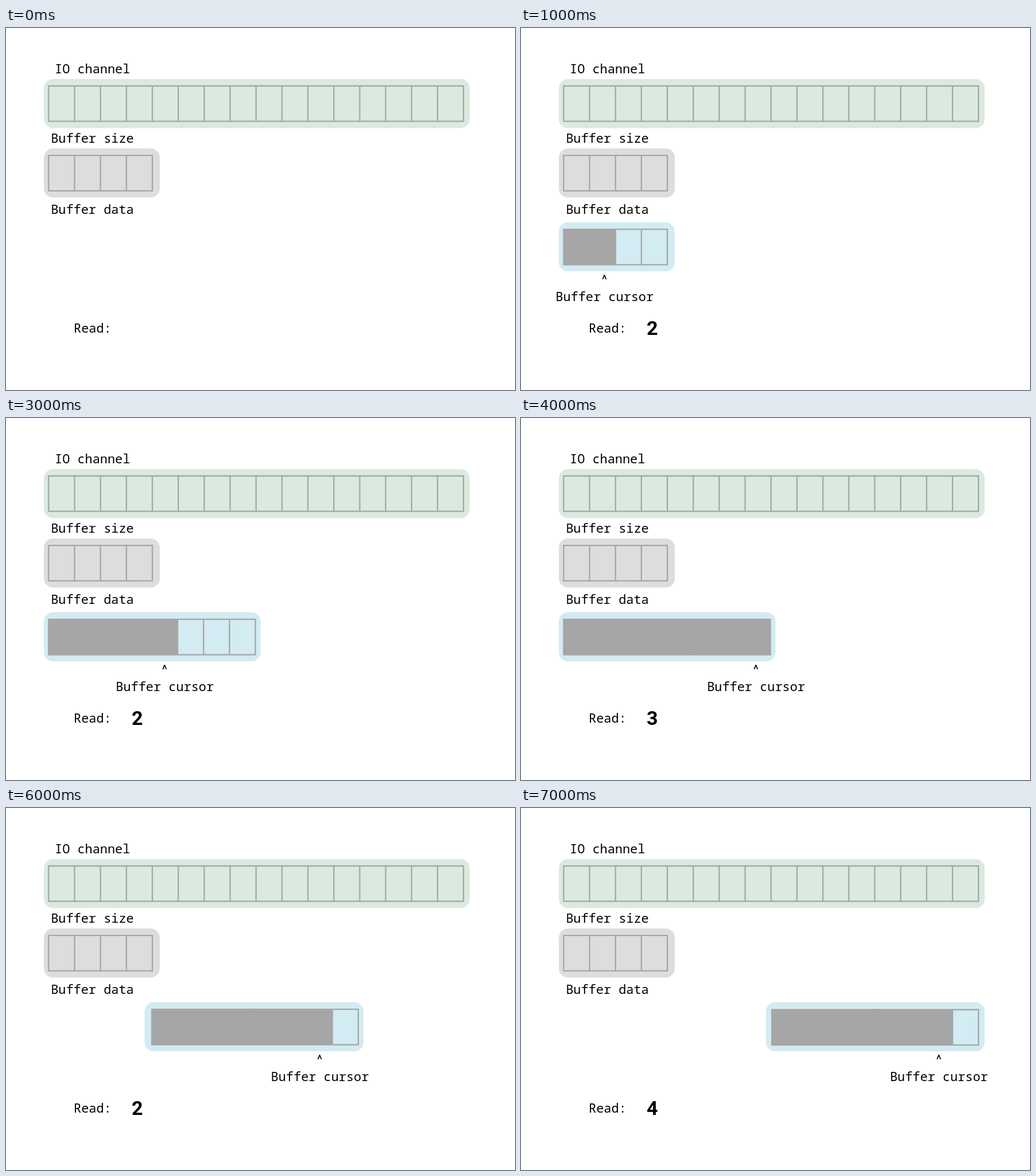
These frames come from a looping animation (887 by 631 pixels, 8000 ms). An HTML page with a canvas:

```html
<!DOCTYPE html>
<html lang="en">
<head>
<meta charset="utf-8">
<title>Buffered reading</title>
<style>
  html, body { margin: 0; width: 100%; height: 100%; overflow: hidden; background: #fff; }
  canvas { display: block; }
</style>
</head>
<body>
<canvas id="stage" width="887" height="631"></canvas>
<script>
const ctx = document.getElementById('stage').getContext('2d');

const STEP = 1000;
const CELL = 45.18;
const GRAY = '#a6a6a6';
const MONO = '21.9px "Roboto Mono", "Noto Sans Mono", monospace';
const CARET = '22px Roboto, sans-serif';
const DIGIT = 'bold 34px Roboto, sans-serif';

// panel: left and right edge; groups: left edges of four-cell blocks
const first = { panel: [66, 268], groups: [74.3], y: 350.9 };
const second = { panel: [66, 443.6], groups: [74.3, 253.9], y: 350.9 };
const third = { panel: [241.6, 623], groups: [254.1, 433.2], y: 350.9 };
const fourth = { panel: [427, 808], groups: [437.2, 616.5], y: 351.5 };

const steps = [
  null,
  { buffer: first, filled: 2, cursor: 145.4, read: 2 },
  { buffer: first, filled: 3, cursor: 186.3, read: 1 },
  { buffer: second, filled: 5, cursor: 276.4, read: 2 },
  { buffer: second, filled: 8, cursor: 409.3, read: 3 },
  { buffer: third, filled: 5, cursor: 455.8, read: 1 },
  { buffer: third, filled: 7, cursor: 546.7, read: 2 },
  { buffer: fourth, filled: 7, cursor: 728, read: 4 }
];

function text(str, x, y, font = MONO, align = 'left') {
  ctx.font = font;
  ctx.textAlign = align;
  ctx.fillStyle = '#000';
  ctx.fillText(str, x, y);
}

function panel(left, right, y, color) {
  ctx.fillStyle = color;
  ctx.beginPath();
  ctx.roundRect(left, y, right - left, 85.5, 16);
  ctx.fill();
}

function cells(x, y, count, filled = 0) {
  const height = 61.7;
  ctx.fillStyle = ctx.strokeStyle = GRAY;
  ctx.lineWidth = 2.3;
  if (filled > 0) ctx.fillRect(x, y, filled * CELL, height);
  ctx.beginPath();
  ctx.rect(x, y, count * CELL, height);
  for (let i = 1; i < count; i++) {
    ctx.moveTo(x + i * CELL, y);
    ctx.lineTo(x + i * CELL, y + height);
  }
  ctx.stroke();
}

function drawBase() {
  ctx.fillStyle = '#fff';
  ctx.fillRect(0, 0, 887, 631);
  text('IO channel', 85, 79);
  panel(66, 808, 89, '#daeadf');
  cells(74.3, 101, 16);
  text('Buffer size', 78.2, 200);
  panel(66, 268, 210, '#dddddd');
  cells(74.3, 222.2, 4);
  text('Buffer data', 78.2, 324);
  text('Read:', 118, 531);
}

function drawStep({ buffer, filled, cursor, read }) {
  panel(...buffer.panel, 338.6, '#d3ebf3');
  buffer.groups.forEach((x, i) => {
    cells(x, buffer.y, 4, Math.max(0, Math.min(4, filled - 4 * i)));
  });
  text('^', cursor, 445.8, CARET, 'center');
  text('Buffer cursor', cursor - 85.1, 476);
  text(String(read), read === 1 ? 220 : 219, 535, DIGIT);
}

const start = performance.now();

function frame() {
  const elapsed = performance.now() - start;
  const step = steps[Math.floor(elapsed / STEP) % steps.length];
  drawBase();
  if (step) drawStep(step);
  requestAnimationFrame(frame);
}
frame();
</script>
</body>
</html>
```
